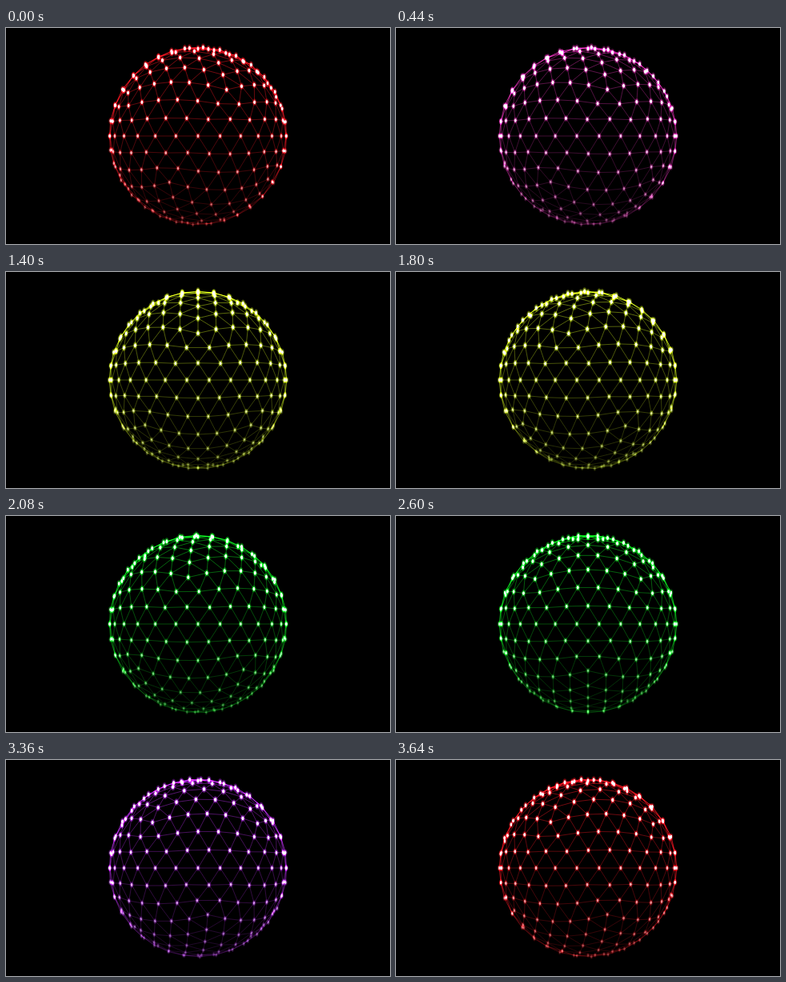
Animation, 480 px wide and 270 px high, one loop 3680 ms. Source, as an HTML page with a canvas:

```html
<!DOCTYPE html>
<html>
<head>
<meta charset="utf-8">
<style>
html, body { margin: 0; width: 100%; height: 100%; overflow: hidden; background: #000; }
canvas { display: block; width: 100%; height: 100%; }
</style>
</head>
<body>
<canvas id="stage" width="480" height="270"></canvas>
<script>
const ctx = document.getElementById('stage').getContext('2d');
const LOOP = 3680, STEP = 40, TURN = 12;
const STARTS = [280, 1080, 1800, 2520, 3240];
const COLORS = [[255, 20, 32], [84, 62, 255], [200, 232, 24], [10, 230, 30], [152, 44, 255]];
const FOCAL = 592.5, DIST = 5.43, CX = 240, CY = 135;
const FREQ = 6, RAD = Math.PI / 180;

// Geodesic sphere: an icosahedron standing on a vertex, each face split FREQ times
const verts = [], edges = [], vertIds = new Map(), edgeKeys = new Set();

function polar(lat, lon) {
  const c = Math.cos(lat);
  return [c * Math.sin(lon), Math.sin(lat), c * Math.cos(lon)];
}

function slerp(a, b, t) {
  const dot = a[0] * b[0] + a[1] * b[1] + a[2] * b[2];
  const w = Math.acos(Math.min(1, dot));
  if (w < 1e-6) return a;
  const p = Math.sin((1 - t) * w) / Math.sin(w), q = Math.sin(t * w) / Math.sin(w);
  return a.map((v, i) => p * v + q * b[i]);
}

function addVert(p) {
  const key = p.map(v => Math.round(v * 1000)).join();
  if (!vertIds.has(key)) {
    vertIds.set(key, verts.length);
    verts.push(p);
  }
  return vertIds.get(key);
}

function addEdge(a, b) {
  const key = Math.min(a, b) + '-' + Math.max(a, b);
  if (edgeKeys.has(key)) return;
  edgeKeys.add(key);
  edges.push([a, b]);
}

function addFace(apex, left, right) {
  let above = [];
  for (let i = 0; i <= FREQ; i++) {
    const a = slerp(apex, left, i / FREQ), b = slerp(apex, right, i / FREQ);
    const row = [];
    for (let j = 0; j <= i; j++) {
      row.push(addVert(i ? slerp(a, b, j / i) : apex));
      if (j) addEdge(row[j - 1], row[j]);
      if (j < i) addEdge(row[j], above[j]);
      if (j) addEdge(row[j], above[j - 1]);
    }
    above = row;
  }
}

const ringLat = Math.atan(0.5);
const upper = i => polar(ringLat, i * 72 * RAD);
const lower = i => polar(-ringLat, (i * 72 + 36) * RAD);
for (let i = 0; i < 5; i++) {
  addFace([0, 1, 0], upper(i), upper(i + 1));
  addFace([0, -1, 0], lower(i), lower(i + 1));
  addFace(lower(i), upper(i), upper(i + 1));
  addFace(upper(i + 1), lower(i), lower(i + 1));
}

function project([x, y, z], angle) {
  const c = Math.cos(angle), s = Math.sin(angle);
  const depth = z * c - x * s, k = FOCAL / (DIST - depth);
  return { x: CX + (x * c + z * s) * k, y: CY - y * k, z: depth, up: y };
}

const clamp = v => Math.max(0, Math.min(1, v));
const mix = (a, b, p) => a.map((v, i) => Math.round(Math.sqrt(v * v * (1 - p) + b[i] * b[i] * p)));
const rgba = (c, a) => `rgba(${c[0]},${c[1]},${c[2]},${a})`;

function stateAt(t) {
  let cycle = 4, step = TURN;
  STARTS.forEach((start, i) => {
    if (t >= start) {
      cycle = i;
      step = Math.min(TURN, Math.floor((t - start) / STEP) + 1);
    }
  });
  const dir = cycle % 2 ? 1 : -1;
  return {
    angle: (18 + dir * 360 * step / TURN) * RAD,
    color: mix(COLORS[cycle], COLORS[(cycle + 1) % 5], clamp((step - 3) / 5))
  };
}

function drawDot(p, color) {
  const light = clamp(0.78 + p.up * 0.45);
  const rx = (1.55 + 0.3 * p.up) * (0.85 + 0.15 * p.z), ry = 2.25 + 0.5 * p.up;
  ctx.save();
  ctx.translate(p.x, p.y);
  ctx.scale(rx, ry);
  const glow = ctx.createRadialGradient(0, 0, 0, 0, 0, 2);
  const core = mix(color, [255, 255, 255], clamp(0.85 + p.up * 0.5));
  glow.addColorStop(0, rgba(core, light));
  glow.addColorStop(0.36, rgba(core, light * 0.95));
  glow.addColorStop(0.58, rgba(color, light * 0.6));
  glow.addColorStop(1, rgba(color, 0));
  ctx.fillStyle = glow;
  ctx.beginPath();
  ctx.arc(0, 0, 2, 0, 2 * Math.PI);
  ctx.fill();
  ctx.restore();
}

function draw({ angle, color }) {
  const pts = verts.map(v => project(v, angle));
  const seen = p => p.z > -0.06;
  ctx.globalCompositeOperation = 'source-over';
  ctx.fillStyle = '#000';
  ctx.fillRect(0, 0, 480, 270);
  ctx.globalCompositeOperation = 'lighter';
  ctx.lineWidth = 0.9;
  for (const [i, j] of edges) {
    const a = pts[i], b = pts[j];
    if (!seen(a) || !seen(b)) continue;
    ctx.strokeStyle = rgba(color, 0.36 + 0.11 * (a.up + b.up));
    ctx.beginPath();
    ctx.moveTo(a.x, a.y);
    ctx.lineTo(b.x, b.y);
    ctx.stroke();
  }
  pts.filter(seen).forEach(p => drawDot(p, color));
}

let shown = -1;
function tick() {
  const slot = Math.floor(performance.now() % LOOP / STEP);
  if (slot !== shown) {
    shown = slot;
    draw(stateAt(slot * STEP));
  }
  requestAnimationFrame(tick);
}
tick();
</script>
</body>
</html>
```
